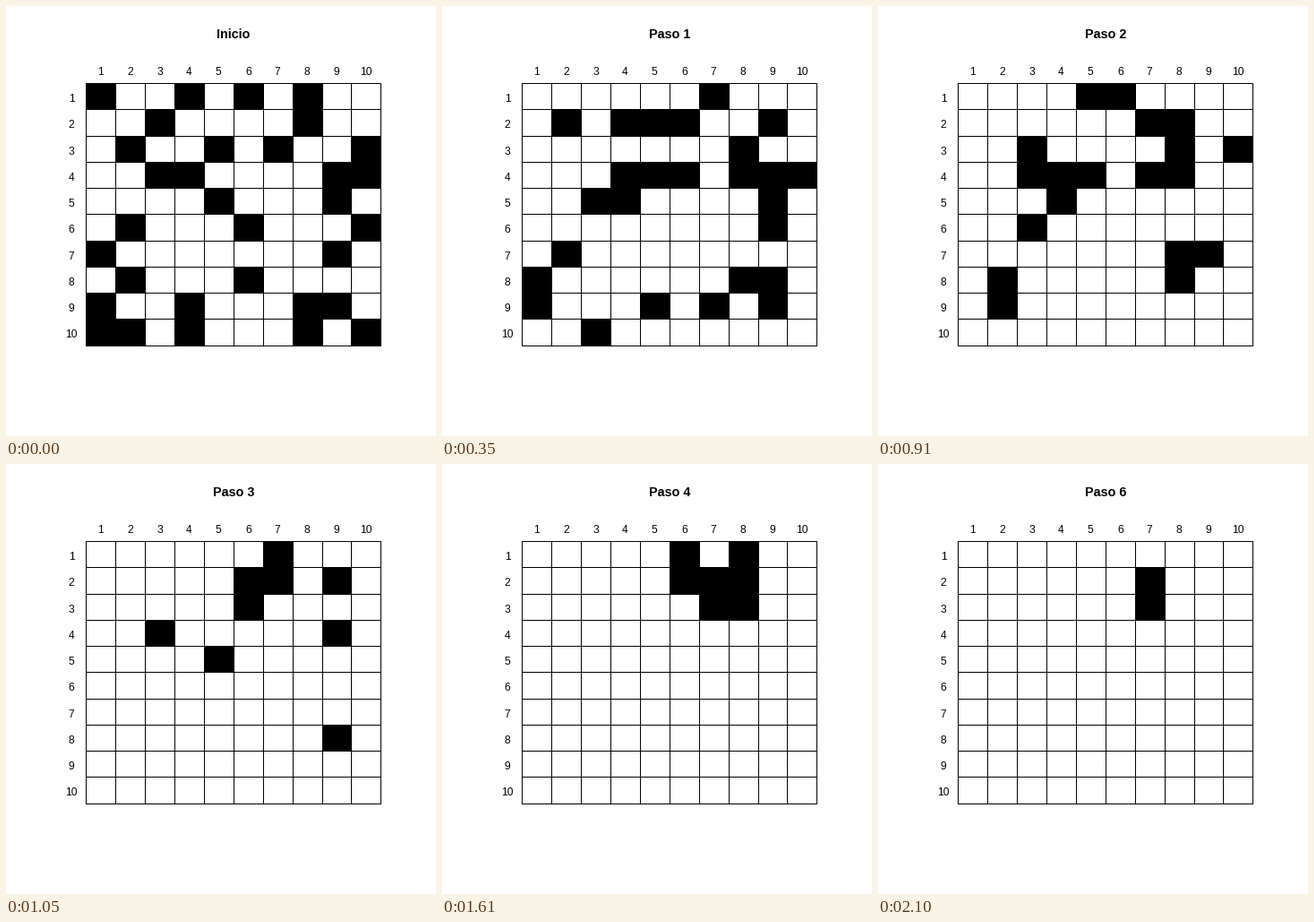
Recreate the animation shown at these times as a matplotlib script. Size 480 px wide and 480 px high, loop 2450 ms.

```python
import numpy as np
import matplotlib.pyplot as plt
from matplotlib.animation import FuncAnimation
from matplotlib.patches import Rectangle

SIZE, DPI, N, STEPS = 480, 100, 10, 7
LEFT, TOP = 89.3, 86.0
CELL_W, CELL_H = 32.9, 29.27

# starting board, one string per row
START = """
#..#.#.#..
..#....#..
.#..#.#..#
..##....##
....#...#.
.#...#...#
#.......#.
.#...#....
#..#...##.
##.#...#.#
""".split()


def step(board):
    """A cell is alive next when exactly three neighbours are alive."""
    pad = np.pad(board, 1).astype(int)
    total = sum(pad[r:r + N, c:c + N] for r in range(3) for c in range(3))
    return total - board == 3


boards = [np.array([[ch == "#" for ch in row] for row in START])]
while len(boards) < STEPS:
    boards.append(step(boards[-1]))

plt.rcParams["font.family"] = "Liberation Sans"
fig = plt.figure(figsize=(SIZE / DPI, SIZE / DPI), dpi=DPI, facecolor="white")
ax = fig.add_axes([0, 0, 1, 1])
ax.set_xlim(0, SIZE)
ax.set_ylim(SIZE, 0)
ax.axis("off")


def box(x0, y0, x1, y1):
    return ax.add_patch(Rectangle((x0, y0), x1 - x0, y1 - y0, fc="black",
                                  lw=0, antialiased=False))


def label(x, y, text, px=12, **kw):
    return ax.text(x, y, text, fontsize=px * 72 / DPI, ha="center",
                   va="baseline", color="black", **kw)


xs = [round(LEFT + CELL_W * i) for i in range(N + 1)]
xs[8] = 353
ys = [round(TOP + CELL_H * i) for i in range(N + 1)]

for x in xs:
    box(x, ys[0], x + 1, ys[-1] + 1)
for y in ys:
    box(xs[0], y, xs[-1] + 1, y + 1)

for i in range(N):
    label(LEFT + CELL_W * (i + 0.5), 77, str(i + 1))
    label(73, round(107 + CELL_H * i), str(i + 1))

cells = [[box(xs[c], ys[r], xs[c + 1], ys[r + 1]) for c in range(N)]
         for r in range(N)]
title = label(254, 36, "", px=14.4, weight="bold")


def draw(i):
    title.set_text(f"Paso {i}" if i else "Inicio")
    for row, states in zip(cells, boards[i]):
        for cell, alive in zip(row, states):
            cell.set_visible(bool(alive))
    return [title]


anim = FuncAnimation(fig, draw, frames=STEPS, interval=350,
                     init_func=lambda: draw(0), repeat=True, repeat_delay=0)
plt.show()
```
